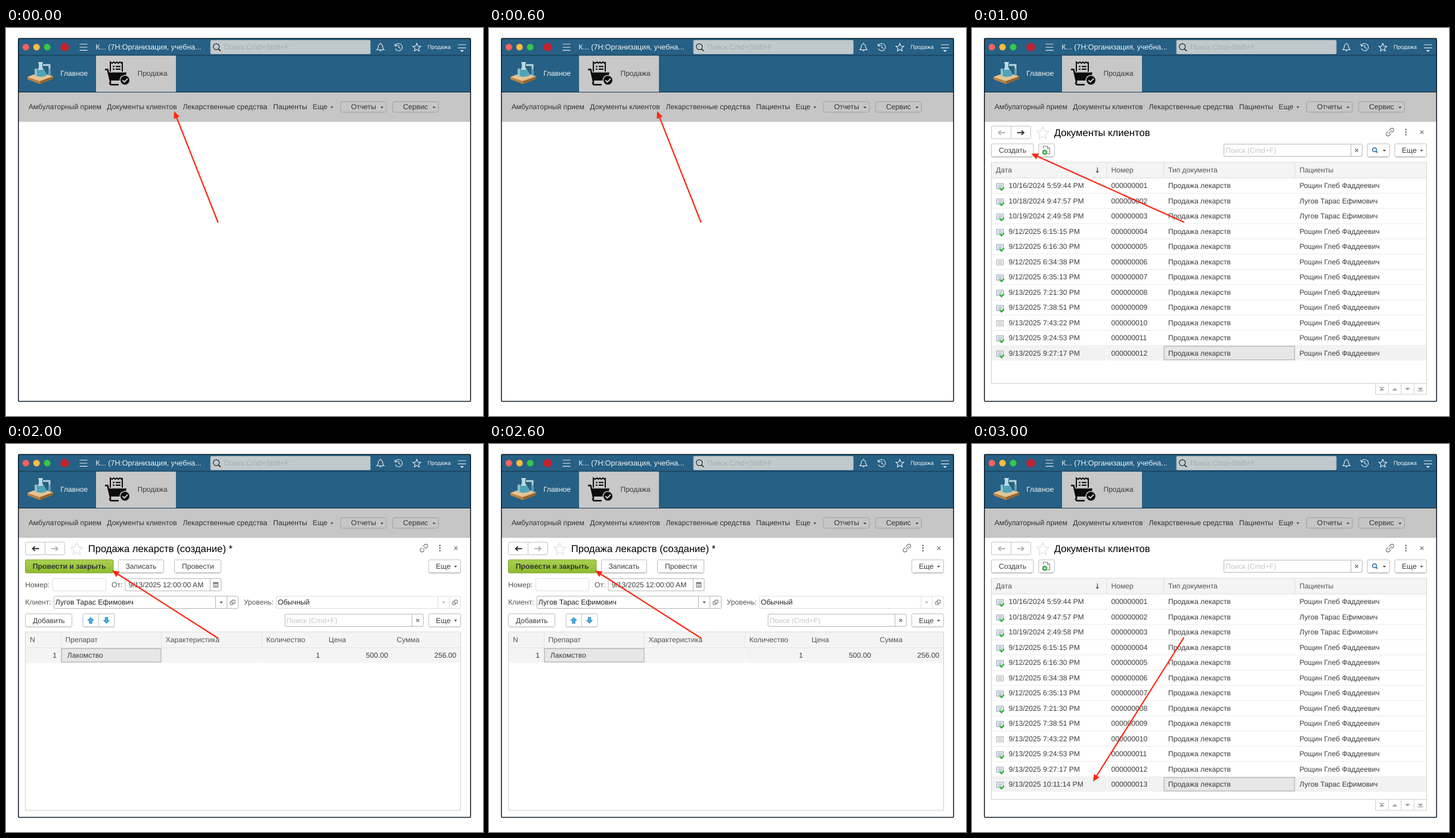
Animation, 800 px wide and 650 px high, one loop 4000 ms. Source, as an HTML page:

```html
<!DOCTYPE html>
<html lang="ru">
<head>
<meta charset="utf-8">
<style>
  html, body { margin: 0; width: 100%; height: 100%; overflow: hidden; background: #fff; }
  svg { display: block; }
  text { font-family: "Liberation Sans", Arial, sans-serif; text-rendering: geometricPrecision; white-space: pre; }
</style>
</head>
<body>
<svg width="800" height="650" viewBox="0 0 800 650"><g id="shell"></g><g id="page"></g></svg>
<script>
const $ = id => document.getElementById(id);
const INK = '#3d3d3d', DIM = '#555', EDGE = '#c4c4c4';

// Basic shapes; text is placed by the vertical middle of its capitals
const text = (x, y, s, fill = INK, size = 12.15, extra = '') =>
  `<text x="${x}" y="${y + size * .355}" fill="${fill}" font-size="${size}" ${extra}>${s}</text>`;
const rect = (x1, y1, x2, y2, fill = '#fff', stroke = 'none', r = 0, w = 1) =>
  `<rect x="${x1}" y="${y1}" width="${x2 - x1}" height="${y2 - y1}" rx="${r}" fill="${fill}" stroke="${stroke}" stroke-width="${w}"/>`;
const line = (d, stroke = EDGE, w = 1, fill = 'none') =>
  `<path d="${d}" stroke="${stroke}" stroke-width="${w}" fill="${fill}"/>`;
const fill = (d, color) => `<path d="${d}" fill="${color}"/>`;
const dot = (x, y, r, color, stroke = 'none', w = 1) =>
  `<circle cx="${x}" cy="${y}" r="${r}" fill="${color}" stroke="${stroke}" stroke-width="${w}"/>`;
const caret = (x, y, color = '#444') => fill(`M${x - 2.5} ${y - 1}h5l-2.5 3z`, color);
const cross = (x, y, r = 2.5) =>
  line(`M${x - r} ${y - r}l${2 * r} ${2 * r}m0 ${-2 * r}l${-2 * r} ${2 * r}`, '#666', 1.1);
const lens = (x, y, r, color, w) =>
  dot(x, y, r, 'none', color, w) + line(`M${x + r * .7} ${y + r * .7}l${r * .75} ${r * .75}`, color, w * 1.4);

function star(x, y, r, color, w) {
  let d = '';
  for (let i = 0; i < 10; i++) {
    const a = i * Math.PI / 5, k = i % 2 ? r * .45 : r;
    d += (i ? 'L' : 'M') + (x + k * Math.sin(a)).toFixed(2) + ' ' + (y - k * Math.cos(a)).toFixed(2);
  }
  return line(d + 'z', color, w);
}

const button = (x1, y, x2, label = '', tx = x1 + 12.5) =>
  rect(x1, y, x2, y + 22, '#fff', '#bdbdbd', 2) +
  line(`M${x1 + 2} ${y + 22}H${x2 - 2}`, '#aaa') + text(tx, y + 11, label);
const more = y => button(709, y, 762.5, 'Еще', 721) + caret(754, y + 11);
const field = (x1, y, x2, stroke = '#b4b4b4', ...splits) =>
  rect(x1, y, x2, y + 20.5, '#fff', stroke, 2) + splits.map(x => line(`M${x} ${y}v20.5`, stroke)).join('');
const search = (x, y) => field(x, y, x + 232, '#b4b4b4', x + 213) +
  text(x + 2.5, y + 10.5, 'Поиск (Cmd+F)', '#c6c6c6') + cross(x + 222.5, y + 10.5);

function cart() {
  return line('M175 73V57l3 2 3-2 2.5 2 2.5-2 2.5 2 2.5-2 3 2 1-2V73', '#0b0b0b', 2) +
    line('M179 64.5h3m2 0h8M179 69h3m2 0h8', '#0b0b0b', 2) +
    line('M166 69.5h4.5l5 22', '#0b0b0b', 2.6) +
    fill('M172 74.5H202L199 88H175z', '#0b0b0b') +
    line('M189 95H177q-3 0-3-4', '#0b0b0b', 2.6) +
    dot(199.5, 87.5, 8.3, '#0b0b0b', '#c6c6c6', 1.6) +
    line('M195.5 87.5l3 3 5.5-5.5', '#d8d8d8', 1.8);
}

function flasks() {
  return fill('M36 82L57 74 79 81V85L57 94 36 86z', '#b7834a') +
    fill('M36 82L57 74 79 81 57 89z', '#e5c492') +
    fill('M57 89L79 81V85L57 94z', '#96662f') +
    fill('M55 58h6v8l8 13q-11 6-21 0l7-13z', '#bcd8df') +
    fill('M53 70h11l5 9q-11 6-21 0z', '#4fa3b8') +
    line('M54 58h8', '#e6eff2', 1.5) +
    fill('M48 68h4v12h-4z', '#8fc0cc') +
    line('M62 62H73V81', '#bcd3dc', 3) + line('M73 68V80', '#5f9db3', 2);
}

function shell() {
  const pale = '#dce5ea';
  let s = rect(21, 18, 779, 107, '#266084') + line('M21 45.7H779', '#173d56', 1.2) +
    rect(21, 107, 779, 156.5, '#c6c6c6') + line('M21 107.3H779', '#173d56', 1.2) +
    line('M21 156.5H779', '#b8b8b8', .8) + rect(151, 46.3, 285, 107, '#c8c8c8');
  ['#fc605b', '#fdbc40', '#34c84a'].forEach((c, i) => s += dot(33.3 + i * 17.9, 32, 5.5, c));
  s += dot(98.5, 32, 7, '#c5202e') +
    line('M123.5 27h13m-13 5.2h13m-13 5.2h13', pale, 1.1) +
    text(150.3, 32, 'К... (7Н:Организация, учебна...', '#f0f4f6', 12.45) +
    rect(343, 20.5, 611, 43.5, '#c2c9cd', '#aab7bf', 1.5, .8) + lens(352.7, 31.3, 5, '#23292d', 1.2) +
    text(366, 32, 'Поиск Cmd+Shift+F', '#a4adb2') +
    line('M622 36.5c3-2 2-6 3-8q3-4 6 0c1 2 0 6 3 8zM628 26v-1.5M626.3 37q1.7 3 3.4 0', pale, 1.2) +
    line('M653.2 29.5a6.1 6.1 0 1 1-.1 5M652 26.5l1 3.8 3.8-.6M658.7 28.5v4l3 1.8', pale, 1.2) +
    star(689, 32.8, 7, pale, 1.2) + text(707, 32, 'Продажа', '#eef3f5', 9.3) +
    line('M758 28h13.5M758 33.3h13.5', pale, 1.2) + fill('M761.5 37h6.5l-3.2 3.3z', pale) +
    flasks() + text(91.3, 76, 'Главное', '#f0f4f6', 12) + cart() + text(220.5, 76, 'Продажа', INK, 12);

  [[37.7, 'Амбулаторный прием'], [169.3, 'Документы клиентов'], [296.5, 'Лекарственные средства'],
   [448, 'Пациенты'], [514.3, 'Еще']].forEach(([x, t]) => s += text(x, 132, t, '#333'));
  s += caret(546.5, 132.5);
  [[561, 'Отчеты'], [648.3, 'Сервис']].forEach(([x, t]) =>
    s += rect(x, 123.5, x + 77, 141, 'none', '#9f9f9f', 3) + text(x + 17.7, 132, t, '#333') + caret(x + 69.5, 132.8));
  return s + rect(20.8, 17.6, 779.2, 625.6, 'none', '#0b1822', 1.5, 1.5);
}

// Heading of the open tab; back and forward tell which arrows are active
function heading(title, back, forward) {
  const tone = on => on ? '#333' : '#b5b5b5';
  return rect(32.5, 164.5, 98.5, 185.5, '#fff', EDGE, 2) + line('M65.5 164.5v21') +
    line('M55.5 175.3H44.5m4-3.7l-4 3.7 4 3.7', tone(back), 1.9) +
    line('M76 175.3H87m-4-3.7l4 3.7-4 3.7', tone(forward), 1.9) +
    star(118.7, 176.5, 10.8, '#d4d4d4', 1) + text(137.7, 175.5, title, '#000', 16.65) +
    line('M699 177l5-5.5M699.5 171.5l3-3q3-1.5 4.5.5 1 2-.5 3.7l-3 3M702 177.5l-2.5 2.7q-2.5 1.5-4.3-.2-1.5-2 0-4l2.7-2.7', '#666', 1.1) +
    [170.3, 174.5, 178.7].map(y => dot(727.7, y, 1.2, '#555')).join('') + cross(754.5, 174.5, 2.8);
}

function docIcon(y, posted) {
  const c = posted ? '#8399ae' : '#a9a9a9';
  return rect(41.5, y - 4.3, 52.5, y + 4.5, '#fafcfd', c) +
    line(`M43.5 ${y - 1.7}h7m-7 2h7m-7 2h7`, c, .9) +
    (posted ? line(`M46.5 ${y + 3.5}l3 3 4.2-4.7`, '#2fae35', 2.3) : '');
}

const PETR = 'Рощин Глеб Фаддеевич', IVAN = 'Лугов Тарас Ефимович';
const DATES = ['10/16/2024 5:59:44', '10/18/2024 9:47:57', '10/19/2024 2:49:58', '9/12/2025 6:15:15',
  '9/12/2025 6:16:30', '9/12/2025 6:34:38', '9/12/2025 6:35:13', '9/13/2025 7:21:30', '9/13/2025 7:38:51',
  '9/13/2025 7:43:22', '9/13/2025 9:24:53', '9/13/2025 9:27:17', '9/13/2025 10:11:14'];

function list(count, forward) {
  let s = heading('Документы клиентов', false, forward) + button(32.5, 194, 103, 'Создать') +
    button(112, 194, 138.3) +
    line('M119.5 202v-4h7l4 4v9h-5M126.5 198v4h4', '#777', 1) + dot(122, 208.3, 4.2, '#2fa53a') +
    line('M119.7 208.3h4.6m-2.3-2.3v4.6', '#fff', 1.3) +
    search(422.5, 194.5) + button(663, 194, 700.3) + lens(675, 204, 3.3, '#2479ad', 1.5) + caret(691.5, 205) +
    more(194) + rect(32.5, 225, 762.5, 595.5, '#fff', '#cfcfcf') + rect(33, 225.5, 762, 251.3, '#f4f4f4') +
    line('M33 251.3H762M226 225.5V251M321.5 225.5V251M541.5 225.5V251', '#dedede') +
    [[40, 'Дата'], [233.5, 'Номер'], [329, 'Тип документа'], [549.3, 'Пациенты']]
      .map(([x, t]) => text(x, 238, t, DIM)).join('') +
    line('M210.3 233.5v8.5m-2.3-2.5l2.3 2.6 2.3-2.6', '#444', 1.1);

  for (let i = 0; i < count; i++) {
    const y = 264 + i * 25.5, last = i === count - 1;
    if (last) s += rect(33, y - 12.6, 762, y + 12.6, '#f2f2f2') +
      line(`M226 ${y - 12.6}v25.2`, '#fafafa') + rect(322.3, y - 11.3, 541, y + 11.3, '#e7e7e7', '#b8b8b8', 0, 1.4);
    else s += line(`M33 ${y + 12.8}H762`, '#ececec');
    s += docIcon(y + 1, i !== 5 && i !== 9) + text(61.5, y, DATES[i] + ' PM') +
      text(233.5, y, String(i + 1).padStart(9, '0')) + text(329, y, 'Продажа лекарств') +
      text(549.3, y, [1, 2, 12].includes(i) ? IVAN : PETR);
  }

  s += rect(676.5, 595.5, 762.5, 613.5, '#fff', '#cfcfcf') + line('M698.3 595.5v18m21.5-18v18m21.5-18v18', '#cfcfcf');
  [687.3, 709, 730.5, 752].forEach((x, i) => {
    const k = i < 2 ? 1 : -1;
    s += fill(`M${x - 4.5} ${605 + 2.3 * k}h9l-4.5 ${-4.3 * k}z`, '#a2a2a2');
    if (i % 3 === 0) s += line(`M${x - 4.5} ${605 - 3 * k}h9`, '#a2a2a2', 1.3);
  });
  return s;
}

const openIcon = x => line(`M${x - 1} 261.5h5v5h-5zM${x - 1} 264h-3v5h5v-2.5`, '#666');
const blueArrow = (x, k) =>
  line(`M${x} ${295.5 - 5 * k}l5 ${5 * k}h-2.8v${5 * k}h-4.4v${-5 * k}h-2.8z`, '#2380b8', .9, '#45aee6');

function form() {
  const end = 'text-anchor="end"';
  return heading('Продажа лекарств (создание) *', true, false) +
    '<linearGradient id="green" x2="0" y2="1"><stop stop-color="#abd153"/><stop offset="1" stop-color="#8cbd2c"/></linearGradient>' +
    rect(32.5, 194, 180, 216, 'url(#green)', '#79a026', 2) +
    text(44.8, 205, 'Провести и закрыть', '#333', 12.25, 'font-weight="bold"') +
    button(188.5, 194, 264.5, 'Записать', 200.5) + button(282.5, 194, 360.5, 'Провести', 295) + more(194) +
    text(32.3, 236, 'Номер:', DIM) + field(78.5, 225.5, 167.5, '#dedede') +
    text(177, 236, 'От:', DIM) + field(200, 225.5, 361, '#b4b4b4', 342.5) + text(205.7, 236, '9/13/2025 12:00:00 AM') +
    rect(348, 232, 355.5, 240, '#fff', '#666') + line('M348 233.2h7.5', '#666', 2) +
    line('M349.5 236.2h4.7m-4.7 2h4.7', '#777', 1) +
    text(32.3, 265, 'Клиент:', DIM) + field(80.5, 255, 389.5, '#b4b4b4', 351.5, 370.5) + text(82.8, 265, IVAN, '#222') +
    caret(361, 265) + openIcon(380) +
    text(398.7, 265, 'Уровень:', DIM) + field(453.5, 255, 762.5, '#dedede', 724.5, 743.5) +
    text(455.7, 265, 'Обычный', '#222') + caret(734, 265, '#aaa') + openIcon(753) +
    button(32.5, 284.5, 110.5, 'Добавить') + button(129, 284.5, 182) + line('M155.5 284.5v22') +
    blueArrow(142, 1) + blueArrow(168.5, -1) + search(468, 285) + more(284.5) +
    rect(32.5, 315, 762.5, 613.5, '#fff', '#cfcfcf') + rect(33, 315.5, 762, 341.5, '#f4f4f4') +
    rect(33, 341.5, 762, 366.7, '#f4f4f4') +
    line('M33 341.5H762M92.5 315.5v26M260.5 315.5v26M429.5 315.5v26', '#e2e2e2') + line('M429.5 342v24', '#fafafa') +
    [[40, 'N'], [99.5, 'Препарат'], [267.7, 'Характеристика'], [436.5, 'Количество'], [541, 'Цена'], [655.3, 'Сумма']]
      .map(([x, t]) => text(x, 328, t, DIM)).join('') +
    rect(93, 342.7, 260, 365.3, '#e7e7e7', '#b8b8b8', 0, 1.4) + text(102.8, 354, 'Лакомство') +
    [[85, '1'], [526.5, '1'], [640.7, '500.00'], [755.3, '256.00']].map(([x, t]) => text(x, 354, t, INK, 12.15, end)).join('');
}

function pointer(x1, y1, x2, y2) {
  const turn = Math.atan2(y2 - y1, x2 - x1) * 180 / Math.PI, len = Math.hypot(x2 - x1, y2 - y1);
  return `<g transform="translate(${x2} ${y2}) rotate(${turn})">` +
    line(`M${-len} 0H-8`, '#fa2813', 2.2) + fill('M0 0L-11.5 5.3V-5.3z', '#fa2813') + '</g>';
}

const scenes = [
  pointer(355.7, 326, 282, 139.5),
  list(12, true) + pointer(356, 325.5, 99.5, 210.5),
  form() + pointer(356, 325.5, 178, 212),
  list(13, false) + pointer(355.5, 324, 203, 565.5)
];

$('shell').innerHTML = shell();
let shown = -1;
function tick() {
  const step = Math.floor(performance.now() / 1000) % scenes.length;
  if (step !== shown) $('page').innerHTML = scenes[shown = step];
  requestAnimationFrame(tick);
}
tick();
</script>
</body>
</html>
```
